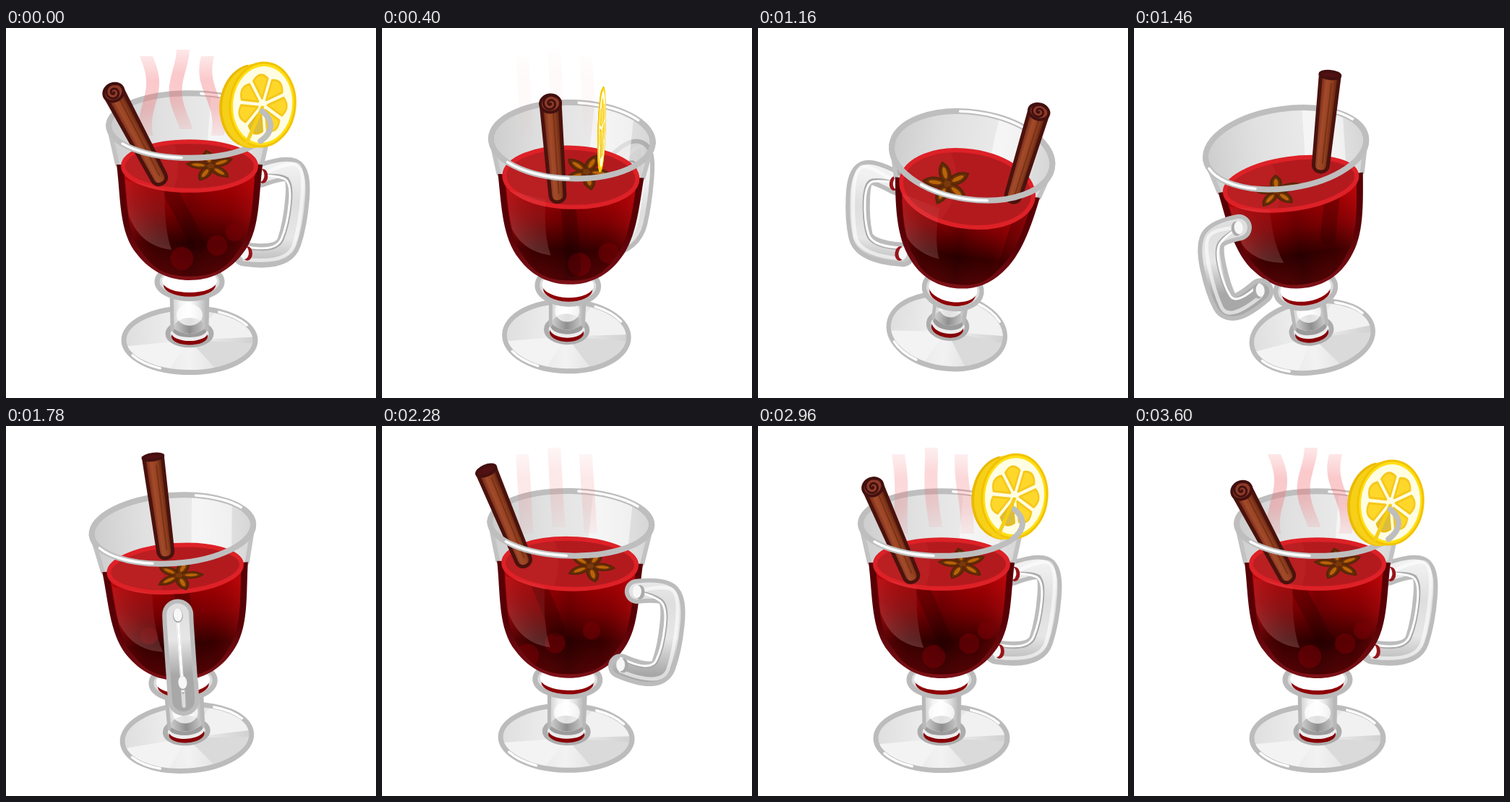
Recreate the animation shown at these times as an HTML page with a canvas. Size 512 by 512 pixels, loop 3620 ms.

```html
<!DOCTYPE html>
<html lang="en">
<head>
<meta charset="utf-8">
<title>Mulled wine</title>
<style>
html, body { margin: 0; width: 100%; height: 100%; overflow: hidden; background: #fff; }
canvas { display: block; width: 100vw; height: 100vh; }
</style>
</head>
<body>
<canvas id="stage" width="512" height="512"></canvas>
<script>
const ctx = document.getElementById('stage').getContext('2d');
const LOOP = 3620, TAU = Math.PI * 2, RAD = Math.PI / 180;
const RIM = 112, WINE = 92;

// Easing: smooth step between two times, bell around a time, one full turn
function ramp(t, from, to) {
  const u = Math.min(1, Math.max(0, (t - from) / (to - from)));
  return u * u * (3 - 2 * u);
}
const bell = (t, center, width) => Math.exp(-(((t - center) / width) ** 2));
const spin = (t, duration, softness) =>
  360 * (softness * ramp(t, 0, duration) + (1 - softness) * Math.min(1, t / duration));

function ellipse(x, y, rx, ry, from = 0, to = TAU) {
  ctx.beginPath();
  ctx.ellipse(x, y, rx, ry, 0, from, to);
}
function line(...points) {
  ctx.beginPath();
  points.forEach(p => ctx.lineTo(...p));
}
function fill(color) { ctx.fillStyle = color; ctx.fill(); }
function stroke(color, width) { ctx.strokeStyle = color; ctx.lineWidth = width; ctx.stroke(); }
function blend(x0, y0, x1, y1, ...colors) {
  const g = ctx.createLinearGradient(x0, y0, x1, y1);
  colors.forEach((c, i) => g.addColorStop(i / (colors.length - 1), c));
  return g;
}
function scoped(draw) { ctx.save(); draw(); ctx.restore(); }

// Pose of the cup: it leans right, then left, seen more from above meanwhile
function cupPose(t) {
  const tilt = 15.5 * bell(t, 900, 330) - 12 * bell(t, 1570, 200) + 1.2 * bell(t, 2280, 200);
  const pitch = ramp(t, 0, 800) - ramp(t, 1100, 2000);
  const c = {
    tilt, angle: tilt * RAD,
    k: .4 + .14 * pitch,
    rim: 56 - 10 * pitch,
    collar: 160 - 20 * pitch,
    foot: 241 - 42 * pitch,
    taper: 1 - .11 * pitch,
    turn: (-13 - spin(t, 2640, .5)) * RAD
  };
  c.v = c.collar / 160;
  c.wineRy = WINE * (.92 * c.k + .009 * tilt);
  c.x = 254 + .9 * tilt + c.foot * Math.sin(c.angle);
  c.y = 432 - 10 * pitch - .25 * tilt - c.foot * Math.cos(c.angle);
  return c;
}

function stickPose(t, c) {
  const angle = (130 - spin(t, 2960, .8)) * RAD;
  const lean = -64 + 108 * ramp(t, 0, 800) - 98 * ramp(t, 900, 2400) - 10 * ramp(t, 2960, LOOP);
  const length = 136 - 90 * (c.k - .4);
  return {
    angle, length,
    x: 64 * Math.cos(angle),
    y: c.wineRy * .7 * Math.sin(angle),
    turn: Math.asin(lean / length) - c.angle,
    face: 12 - 8 * (ramp(t, 1000, 1600) - ramp(t, 1900, 2900))
  };
}

function drawFoot(c) {
  const y = c.foot, rx = 91, ry = rx * (c.k + .09) * c.taper;
  ellipse(0, y, rx, ry);
  fill(blend(-rx, y, rx, y, '#dedede', '#f2f2f2', '#d0d0d0'));
  for (const [from, color] of [[-1.15, '#f1f1f1'], [1.9, '#f3f3f3'], [.1, '#dadada']]) {
    ctx.beginPath();
    ctx.moveTo(0, y);
    ctx.ellipse(0, y, rx, ry, 0, from, from + 1.05);
    fill(color);
  }
  ellipse(0, y, rx, ry);
  stroke('#bcbcbc', 7);
  for (const from of [-1.1, 2.04]) {
    ellipse(0, y, rx - 1, ry - 1, from, from + .6);
    stroke('#fff', 3.5);
  }
}

function drawStem(c) {
  const top = c.collar, y = c.foot - 9, k = (c.k + .06) * c.taper;
  ellipse(0, y, 30, 30 * k + 2);
  fill('#e4e4e4');
  stroke('#adadad', 7);
  ellipse(0, y + 4, 25, 25 * k);
  fill('#870006');
  ellipse(0, y - 1, 25, 24 * k);
  fill('#ededed');
  ellipse(0, y - 5, 24, 22 * k);
  fill('#9b9b9b');

  ctx.beginPath();
  ctx.moveTo(-24, top + 8);
  ctx.lineTo(-23, y - 8);
  ctx.quadraticCurveTo(0, y + 8, 23, y - 8);
  ctx.lineTo(24, top + 8);
  fill(blend(-24, 0, 24, 0, '#cfcfcf', '#f4f4f4', '#fff', '#dedede', '#b5b5b5'));
  scoped(() => {
    ctx.clip();
    ellipse(0, y - 6, 23, 16);
    fill(blend(-20, 0, 20, 0, '#c8c8c8', '#8e8e8e', '#c4c4c4'));
    ellipse(0, y - 26, 18, 15);
    fill('rgba(255,255,255,.72)');
  });
  for (const side of [-1, 1]) {
    line([side * 25, top + 12], [side * 24, y - 6]);
    stroke('#b8b8b8', 5);
  }
  ellipse(0, top, 45, 45 * k + 3);
  fill('#dcdcdc');
  stroke('#bababa', 7);
  ellipse(0, top + 5, 36, 34 * k);
  fill('#8d0006');
  ellipse(0, top - 1, 38, 35 * k);
  fill('#fff');
}

// The handle is a flat loop of (radius, height) points turned about the cup's axis
function drawHandle(c) {
  const cos = Math.cos(c.turn), sin = Math.sin(c.turn);
  const point = (r, h) => [r * cos, h * c.v + r * sin * c.k];
  const trace = (inset = 0) => {
    const p = [[100, 22], [134 - inset, 13 + inset], [156 - inset, 24 + inset], [150 - inset, 94],
      [133 - inset, 142 - inset], [78, 129 - inset]].map(q => point(...q));
    ctx.beginPath();
    ctx.moveTo(...p[0]);
    for (let i = 1; i < p.length - 1; i++) {
      const last = i === p.length - 2, n = p[i + 1];
      ctx.quadraticCurveTo(...p[i], last ? n[0] : (p[i][0] + n[0]) / 2, last ? n[1] : (p[i][1] + n[1]) / 2);
    }
  };
  const width = 33 + 10 * sin * sin;
  trace();
  stroke('#bcbcbc', width);
  stroke(blend(0, 0, 0, 150 * c.v, '#f1f1f1', '#dedede', '#e6e6e6', '#a8a8a8'), width - 12);
  trace(-7);
  stroke('rgba(255,255,255,.6)', 5);
  trace(9);
  stroke('#a9a9a9', 3);
  trace(11);
  stroke('#fff', 3);
  for (const [r, h] of [[101, 23], [79, 128]]) {
    const [x, y] = point(r, h);
    ellipse(x + 3 * cos, y, 7, 10);
    fill(sin < .1 ? '#98141a' : '#aaa');
    ellipse(x - cos, y - 1, 6, 9);
    fill('#f7f7f7');
  }
}

function bowlPath(inset, c) {
  const w = 101 - inset, low = w * c.taper, v = c.v, b = 158 * v - inset * .6;
  ctx.beginPath();
  ctx.moveTo(-w, -2);
  ctx.bezierCurveTo(-w + 6, 45 * v, -low + 3, 92 * v, -low * .72, 122 * v - inset * .4);
  ctx.bezierCurveTo(-low * .52, 148 * v, -low * .26, b, 0, b);
  ctx.bezierCurveTo(low * .26, b, low * .52, 148 * v, low * .72, 122 * v - inset * .4);
  ctx.bezierCurveTo(low - 3, 92 * v, w - 6, 45 * v, w, -2);
  ctx.closePath();
}

function drawWine(c, s) {
  const v = c.v;
  bowlPath(0, c);
  fill(blend(0, 0, 0, 157 * v, '#570005', '#570006', '#7c1117'));
  bowlPath(9, c);
  fill(blend(0, 20, 0, 150 * v, '#a80003', '#790002', '#2b0000', '#4d0305'));
  scoped(() => {
    ctx.clip();
    ctx.fillStyle = blend(-92, 0, 92, 0, 'rgba(205,20,25,.4)', 'rgba(150,0,0,.1)', 'rgba(25,0,0,.2)', 'rgba(150,0,0,.1)', 'rgba(215,20,25,.4)');
    ctx.fillRect(-100, 0, 200, 160);
    for (let i = 0; i < 3; i++) {
      const a = s.angle - (30 + 48 * i) * RAD;
      if (Math.sin(a) < 0) continue;
      ellipse(62 * Math.cos(a), (128 - 18 * i) * v, 16 - 2 * i, 16 - 2 * i);
      fill('rgba(125,0,6,.5)');
    }
    // Refracted continuation of the stick
    ctx.translate(s.x + 16, s.y + 20);
    ctx.rotate(s.turn);
    line([0, 0], [0, 80]);
    stroke('rgba(35,0,0,.28)', 21);
  });
  ellipse(0, 0, WINE, c.wineRy);
  fill('#b31a1e');
  stroke('#dd2127', 6);
  scoped(() => {
    ellipse(0, 0, WINE - 3, c.wineRy - 3);
    ctx.clip();
    ellipse(-64, 0, 48, 65);
    fill('rgba(225,55,60,.16)');
  });
}

function drawStick({ x, y, turn, length, face }) {
  scoped(() => {
    ctx.translate(x, y);
    ctx.rotate(turn);
    ctx.beginPath();
    ctx.moveTo(-13, -length);
    ctx.lineTo(-10, -2);
    ctx.bezierCurveTo(-9, 10, 9, 10, 10, -2);
    ctx.lineTo(13, -length);
    ctx.closePath();
    fill(blend(-12, 0, 12, 0, '#6b2414', '#a34b2b', '#93401f', '#57200f'));
    stroke('#4b120d', 5);
    line([3, -length + 12], [2, -5]);
    stroke('rgba(79,25,12,.4)', 2);
    ellipse(0, -length, 14, face);
    fill(face > 9 ? '#8e3a27' : '#511012');
    stroke('#43100f', 4);
    if (face < 9) return;
    ctx.beginPath();
    for (let a = 0; a < 12; a += .25) {
      ctx.lineTo(a * Math.cos(a), -length + face * a / 12 * Math.sin(a));
    }
    stroke('#40100f', 2.8);
  });
}

function drawStar(t, c) {
  const orbit = -spin(t, 2440, .5) * RAD;
  scoped(() => {
    ctx.translate(29 * Math.cos(orbit), c.wineRy * .3 * Math.sin(orbit));
    ctx.scale(1, .2 + c.wineRy / 75);
    ctx.rotate(c.turn - 87 * RAD);
    for (let i = 0; i < 5; i++) {
      ctx.rotate(TAU / 5);
      ctx.beginPath();
      ctx.moveTo(0, 0);
      ctx.bezierCurveTo(9, -10, 24, -9, 33, 0);
      ctx.bezierCurveTo(24, 9, 9, 10, 0, 0);
      fill('#6b3007');
      stroke('#592608', 3);
      ellipse(17, 0, 9, 3);
      fill('#b96408');
    }
    ellipse(0, 0, 5, 5);
    fill('#79390b');
  });
}

function drawBackGlass(c) {
  const top = -c.rim, ry = RIM * c.k;
  ctx.beginPath();
  ctx.ellipse(0, top, RIM, ry, 0, Math.PI, TAU);
  ctx.lineTo(101, 0);
  ctx.lineTo(-101, 0);
  ctx.closePath();
  fill(blend(-RIM, 0, RIM, 0, 'rgba(135,135,135,.42)', 'rgba(160,160,160,.32)', 'rgba(180,180,180,.28)', 'rgba(150,150,150,.4)'));
  scoped(() => {
    ctx.clip();
    line([30, top - ry], [86, top - ry], [78, 0], [22, 0]);
    fill('rgba(255,255,255,.55)');
  });
  for (const side of [-1, 1]) {
    line([side * 111, top + 5], [side * 100, -2]);
    stroke('#c2c2c2', 6);
  }
}

function drawRim(c, from, to, color = '#bebebe', width = 8) {
  ellipse(0, -c.rim, RIM, RIM * c.k, from, to);
  stroke(color, width);
}
function drawGlint(c, from) {
  const start = from - .045 * c.tilt;
  drawRim(c, start, start + .88, '#fff', 3.5);
}

function drawSheen(c) {
  scoped(() => {
    bowlPath(10, c);
    ctx.clip();
    ctx.beginPath();
    ctx.moveTo(-94, 18);
    ctx.lineTo(-34, 32);
    ctx.quadraticCurveTo(-36, 85 * c.v, -25, 116 * c.v);
    ctx.quadraticCurveTo(-75, 110 * c.v, -88, 55 * c.v);
    fill(blend(-30, 20, -75, 110 * c.v, 'rgba(255,190,190,.03)', 'rgba(255,190,190,.1)', 'rgba(255,205,205,.25)'));
  });
}

function drawSteam(t) {
  const opacity = 1 - ramp(t, 0, 500) + .65 * ramp(t, 2100, 2400) + .35 * ramp(t, 2700, LOOP);
  const bend = 7 * opacity ** 4, tone = a => `rgba(243,105,110,${a * opacity})`;
  for (let i = 0; i < 3; i++) {
    const x = 194 + 44 * i, y0 = i === 1 ? 30 : 39, y1 = y0 + 110;
    const edge = (y, side) => ctx.lineTo(x + 9 * side + bend * Math.sin((y - y0) / 21 + i * 1.8) + (y - y0) * .06, y);
    ctx.beginPath();
    for (let y = y0; y <= y1; y += 5) edge(y, -1);
    for (let y = y1; y >= y0; y -= 5) edge(y, 1);
    fill(blend(0, y0 - 5, 0, y1, tone(.12), tone(.36), tone(.34), tone(.12)));
  }
}

// The slice slides off along the rim and later hops back on
function drawLemon(t, c) {
  const leave = ramp(t, 0, 420) * (t < 2000);
  const size = t < 2000 ? 1 - ramp(t, 400, 480) : ramp(t, 2500, 2690);
  if (size < .01) return;
  scoped(() => {
    ctx.translate(101 - 60 * leave, -c.rim - 29 + 12 * leave - 40 * bell(t, 2690, 220));
    ctx.scale((1 - .9 * leave) * size, size);
    ctx.rotate(.1);
    for (let i = 14; i >= 0; i--) {
      ellipse(-i * .95, i * .25, 45, 58);
      fill(i > 11 ? '#efbd00' : i ? '#f6d019' : '#ffdf16');
    }
    ellipse(-13, 3, 45, 57, 1.9, 4.4);
    stroke('#eab900', 3);
    ellipse(0, 0, 45, 58);
    stroke('#f2c300', 3);
    ellipse(0, 0, 41, 53);
    fill('#fffde2');
    scoped(() => {
      ctx.scale(1, 1.24);
      ctx.rotate(103 * RAD);
      ctx.lineJoin = 'round';
      for (let i = 0; i < 7; i++) {
        ctx.beginPath();
        ctx.moveTo(7, 0);
        ctx.lineTo(28, -10);
        ctx.quadraticCurveTo(39, 0, 28, 10);
        ctx.closePath();
        fill(i ? '#ffd72a' : '#d9bd43');
        stroke(i ? '#f5c81b' : '#e7bd19', 2.5);
        ctx.rotate(TAU / 7);
      }
    });
    line([0, 4], [-16, 53]);
    stroke('#f6ce18', 5);
  });
}

function render(t) {
  const c = cupPose(t), s = stickPose(t, c);
  const front = Math.sin(c.turn) > 0;
  const inCup = draw => scoped(() => {
    ctx.translate(c.x, c.y);
    ctx.rotate(c.angle);
    draw();
  });

  ctx.fillStyle = '#fff';
  ctx.fillRect(0, 0, 512, 512);
  ctx.lineCap = 'round';
  inCup(() => {
    scoped(() => {
      ctx.scale(c.taper, 1);
      drawFoot(c);
      drawStem(c);
    });
    if (!front) drawHandle(c);
    drawBackGlass(c);
    drawRim(c, Math.PI, TAU);
    drawGlint(c, -1.43);
  });
  drawSteam(t);
  inCup(() => {
    drawWine(c, s);
    drawStar(t, c);
    drawStick(s);
    drawSheen(c);
    drawRim(c, 0, Math.PI);
    drawGlint(c, 1.67);
    drawLemon(t, c);
    drawRim(c, -.45, .5);
    if (front) drawHandle(c);
  });
}

function frame() {
  render(Math.floor(performance.now() % LOOP / 20) * 20);
  requestAnimationFrame(frame);
}
frame();
</script>
</body>
</html>
```
